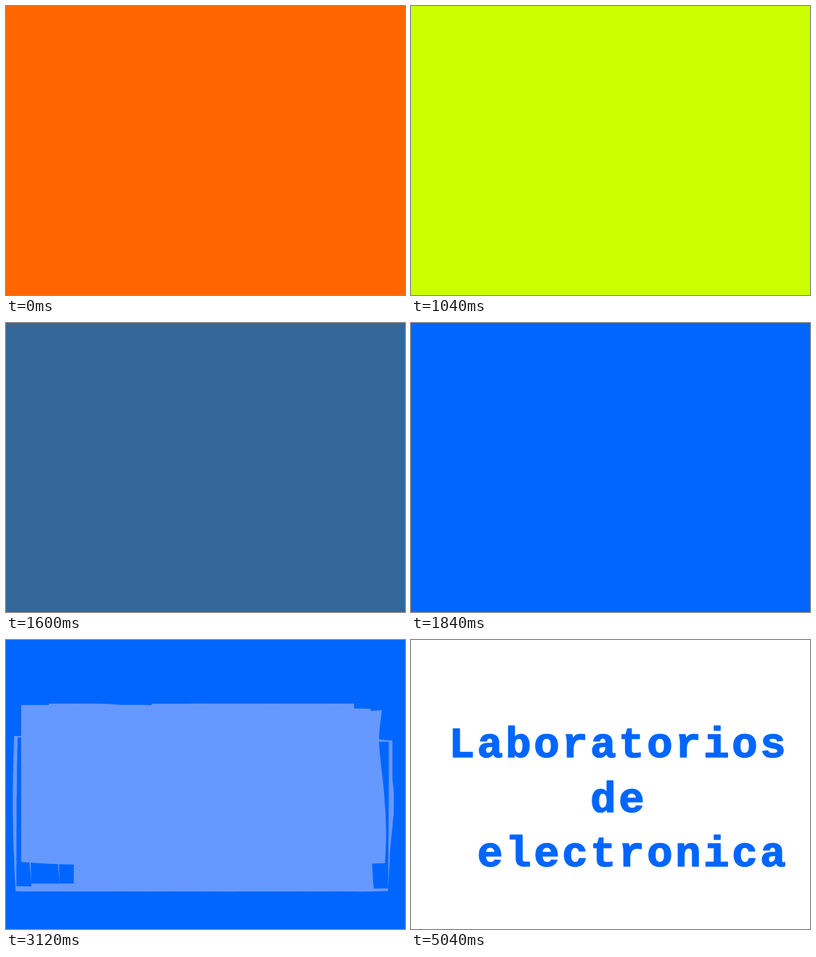
Recreate the animation shown at these times as an HTML page. Size 550 px wide and 400 px high, loop 5120 ms.

```html
<!DOCTYPE html>
<html lang="pt">
<head>
<meta charset="utf-8">
<title>Laboratorios de eletrónica</title>
<style>
  html, body { margin: 0; width: 100%; height: 100%; overflow: hidden; }
  svg { display: block; width: 550px; height: 400px; }
  text {
    font: bold 59px "Courier New", "Liberation Mono", monospace;
    letter-spacing: 3.6px;
    stroke-width: 1.5px;
    stroke-linejoin: round;
    white-space: pre;
  }
  #white { fill: #fff; stroke: #fff; }
  #blue { fill: #06f; stroke: #06f; }
</style>
</head>
<body>
<svg viewBox="0 0 550 400">
  <rect id="bg" width="550" height="400" fill="#f60"/>
  <g id="morph"></g>
  <g id="white" visibility="hidden">
    <text x="36.3" y="220">Laboratorios</text>
    <text x="16.8" y="295">de eletrónica</text>
  </g>
  <g id="blue" visibility="hidden">
    <text x="52.3" y="162">Laboratorios</text>
    <text x="247.3" y="237.5">de</text>
    <text x="91.3" y="313">electronica</text>
  </g>
</svg>
<script>
const W = 550, H = 400, LOOP = 5120, STEP = 80;
const PITCH = 39, SCALE = 2, PAD = 6, BASE = 62;
const SIDE = 24, POINTS = SIDE * 4;
const BLUE = [0, 102, 255], WHITE = [255, 255, 255];
const COLORS = [
  [0, [255, 102, 0]], [13, [204, 255, 0]], [17, [153, 153, 102]], [23, BLUE]
];

const $ = id => document.getElementById(id);
const lerp = (a, b, t) => a + (b - a) * t;
const mix = (a, b, t) => a.map((v, i) => lerp(v, b[i], t));
// Nearest web-safe colour, halves rounding down.
const snap = c => c.map(v => Math.ceil(v / 51 - 0.5) * 51);
const css = c => `rgb(${c.map(Math.round)})`;
const show = (el, on) => el.setAttribute('visibility', on ? 'visible' : 'hidden');

const pen = document.createElement('canvas').getContext('2d', { willReadFrequently: true });
const cw = pen.canvas.width = (PITCH + PAD * 2) * SCALE;
const ch = pen.canvas.height = 84 * SCALE;
pen.font = `bold ${59 * SCALE}px "Courier New", "Liberation Mono", monospace`;
pen.lineWidth = 1.5 * SCALE;
pen.lineJoin = 'round';

// Follow the pixel borders of a glyph; outer loops run clockwise, holes the other way.
function traceLoops(char) {
  pen.clearRect(0, 0, cw, ch);
  pen.fillText(char, PAD * SCALE, BASE * SCALE);
  pen.strokeText(char, PAD * SCALE, BASE * SCALE);
  const data = pen.getImageData(0, 0, cw, ch).data;
  const on = (x, y) => x >= 0 && y >= 0 && x < cw && y < ch && data[(y * cw + x) * 4 + 3] > 127;
  const next = new Map();
  const add = (x, y, x2, y2) => {
    const key = x + ',' + y;
    if (!next.has(key)) next.set(key, []);
    next.get(key).push([x2, y2]);
  };
  for (let y = 0; y < ch; y++) for (let x = 0; x < cw; x++) {
    if (!on(x, y)) continue;
    if (!on(x, y - 1)) add(x, y, x + 1, y);
    if (!on(x + 1, y)) add(x + 1, y, x + 1, y + 1);
    if (!on(x, y + 1)) add(x + 1, y + 1, x, y + 1);
    if (!on(x - 1, y)) add(x, y + 1, x, y);
  }
  const loops = [];
  for (const ends of next.values()) {
    while (ends.length) {
      const loop = [];
      let list = ends;
      while (list && list.length) {
        const p = list.pop();
        loop.push(p);
        list = next.get(p.join());
      }
      if (loop.length > 12) loops.push(loop);
    }
  }
  return loops;
}

// Evenly spaced points around a loop, starting at its top left.
function resample(loop) {
  const n = loop.length;
  let start = 0, area = 0;
  loop.forEach(([x, y], i) => {
    const [x2, y2] = loop[(i + 1) % n];
    area += x * y2 - x2 * y;
    if (x + y < loop[start][0] + loop[start][1]) start = i;
  });
  const points = Array.from({ length: POINTS }, (_, i) =>
    loop[(start + Math.floor(i * n / POINTS)) % n]);
  return { points, hole: area < 0 };
}

function stagePoint(i) {
  const f = (i % SIDE) / SIDE;
  return [[f * W, 0], [W, f * H], [W - f * W, H], [0, H - f * H]][Math.floor(i / SIDE) % 4];
}

const letters = [];

function addLine(line) {
  const x = +line.getAttribute('x'), y = +line.getAttribute('y');
  [...line.textContent].forEach((char, n) => {
    if (char === ' ') return;
    const path = document.createElementNS('http://www.w3.org/2000/svg', 'path');
    $('morph').append(path);
    const loops = traceLoops(char).map(resample).map(({ points, hole }) =>
      points.map(([px, py], i) => ({
        from: stagePoint(hole ? POINTS - i : i),
        to: [x + n * PITCH + px / SCALE - PAD, y + py / SCALE - BASE]
      })));
    letters.push({ path, loops });
  });
}

function drawMorph(t) {
  const color = mix(BLUE, WHITE, t);
  const fill = css(snap(color));
  const flat = fill === css(BLUE);
  for (const { path, loops } of letters) {
    path.setAttribute('d', loops.map(loop => 'M' + loop.map(({ from, to }) =>
      mix(from, to, t).map(v => v.toFixed(1)).join()).join('L') + 'Z').join(''));
    path.setAttribute('fill', flat ? 'none' : fill);
    path.setAttribute('stroke', flat ? css(color) : 'none');
  }
}

function background(step) {
  if (step === 63) return WHITE;
  const i = COLORS.findIndex(([at]) => at > step);
  if (i < 0) return BLUE;
  const [a, from] = COLORS[i - 1], [b, to] = COLORS[i];
  return snap(mix(from, to, (step - a) / (b - a)));
}

document.querySelectorAll('#white text').forEach(addLine);

const began = performance.now();
let last = -1;

function frame() {
  const step = Math.floor((performance.now() - began) % LOOP / STEP);
  if (step !== last) {
    last = step;
    const morphing = step > 34 && step < 44;
    $('bg').setAttribute('fill', css(background(step)));
    show($('morph'), morphing);
    show($('white'), step >= 44 && step < 63);
    show($('blue'), step === 63);
    if (morphing) drawMorph((step - 34) / 10);
  }
  requestAnimationFrame(frame);
}
frame();
</script>
</body>
</html>
```
